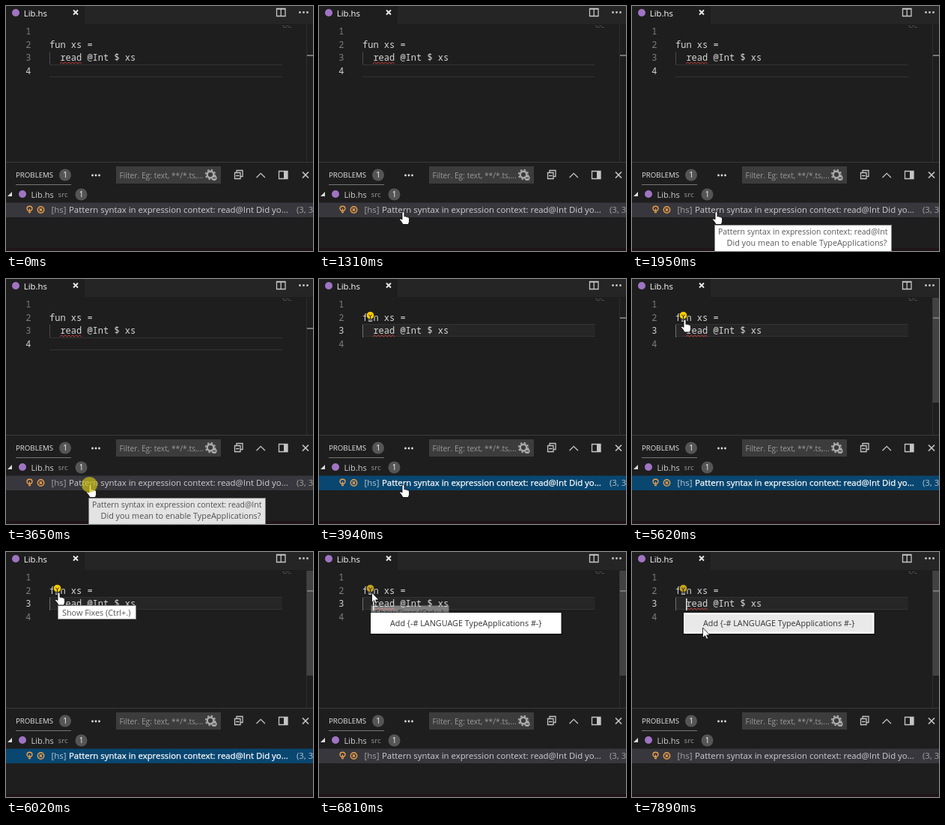
Write an HTML page that moves like this. It is 410x327 px and loops after 8 s.

```html
<!DOCTYPE html>
<html lang="en">
<head>
<meta charset="utf-8">
<title>Quick fix in the editor</title>
<style>
html, body { margin: 0; height: 100%; overflow: hidden; background: #1e1e1e; }
svg { display: block; width: 410px; height: 327px; font: 11.4px "Open Sans", "Noto Sans", sans-serif; }
text { white-space: pre; fill: #d0d0d0; }
.code text { font: 12px "Noto Sans Mono", "DejaVu Sans Mono", monospace; fill: #d8d8d8; }
.code .num { fill: #7c7c7c; text-anchor: end; }
.code .num.on { fill: #d0d0d0; }
.line { fill: none; stroke: #c5c5c5; stroke-width: 1.3; }
.badge { fill: #555; }
.count { font-size: 10px; text-anchor: middle; fill: #fff; }
.dim { fill: #a4a4a4; }
.focus .dim { fill: #b9c6d0; }
.focus #message { fill: #fff; stroke: #fff; stroke-width: .25; }
.tip rect { fill: #fff; stroke: #888; }
.tip text { fill: #575757; font-size: 10.85px; }
.mouse { fill: #fff; stroke: #000; stroke-width: .8; stroke-linejoin: round; }
</style>
</head>
<body>
<svg viewBox="0 0 410 327">
  <!-- tab bar -->
  <rect x="105" width="305" height="24" fill="#252526"/>
  <circle cx="13" cy="9" r="5" fill="#a074c4"/>
  <text x="23.800" y="13.500" font-size="11.300" style="fill:#fff">Lib.hs</text>
  <path class="line" d="M90 5.500l6 6m0-6l-6 6" style="stroke:#eee;stroke-width:1.800"/>
  <path class="line" d="M361.500 3.500h11.500v10h-11.500zM367.200 3.500v10M361.500 4h11.500"/>
  <g fill="#c5c5c5"><circle cx="392.500" cy="8.500" r="1.400"/><circle cx="397.500" cy="8.500" r="1.400"/><circle cx="402.500" cy="8.500" r="1.400"/></g>

  <!-- editor -->
  <path d="M369 26.500h3m2 0h4M370 28.500h5m2 0h4" stroke="#555" stroke-width=".8"/>
  <path d="M401.500 25V208" stroke="#2f2f2f"/>
  <rect id="slider" x="401.500" y="25" width="8.500" height="140" fill="#424242"/>
  <rect id="mark" x="402" width="8" height="2" fill="#777"/>
  <g id="current">
    <rect id="shade" x="58" width="310.500" height="17" fill="#262626"/>
    <path d="M58 .500h310.500M58 16.500h310.500" stroke="#333"/>
  </g>
  <path id="guide" d="M58.500 61v17"/>
  <g class="code">
    <text class="num" x="33.500" y="38">1</text>
    <text class="num" x="33.500" y="55.500">2</text>
    <text class="num" id="n3" x="33.500" y="73">3</text>
    <text class="num" id="n4" x="33.500" y="91">4</text>
    <text x="58" y="55.500">fun xs =</text>
    <text x="72.400" y="73">read @Int $ xs</text>
  </g>
  <path id="squiggle" fill="none" stroke="#c9403a"/>
  <path id="caret" d="M72.800 62v16" stroke="#ddd" stroke-width="1.600"/>
  <g id="bulb" stroke="#1e1e1e">
    <rect x="65.700" y="51" width="5.600" height="6.500" fill="#bbb"/>
    <circle cx="68.500" cy="48.500" r="5.300"/>
    <path d="M66.300 47.500l2.200 2.500 2.200-2.500M68.500 50v3M66.500 55h4" fill="none"/>
  </g>

  <!-- panel -->
  <path d="M0 208.500H410" stroke="#3a3a3a"/>
  <text x="13" y="229" font-size="9.700" style="fill:#e7e7e7">PROBLEMS</text>
  <path d="M13 238.500H87" stroke="#777"/>
  <circle class="badge" cx="79" cy="225.500" r="8"/>
  <text class="count" x="79" y="229">1</text>
  <g fill="#ddd"><circle cx="115.500" cy="226" r="1.400"/><circle cx="120" cy="226" r="1.400"/><circle cx="124.500" cy="226" r="1.400"/></g>
  <rect x="147" y="214" width="140" height="23" fill="#3c3c3c"/>
  <text x="151.500" y="229.500" font-size="10.250" style="fill:#999">Filter. Eg: text, **/*.ts,...</text>
  <circle cx="273" cy="225" r="4.300" fill="none" stroke="#aaa" stroke-width="2.400"/>
  <circle cx="273" cy="225" r="6.300" fill="none" stroke="#aaa" stroke-width="1.800" stroke-dasharray="2.470"/>
  <circle cx="278" cy="229.500" r="3.600" fill="#aaa"/>
  <path d="M276 229.500h4" stroke="#3c3c3c" stroke-width="1.300"/>
  <path class="line" d="M308 222v-2.500h8v8h-2.500M305.500 222.500h7.500v8h-7.500zM307 226.500h4.500"/>
  <path class="line" d="M334.500 229l5.700-5.700 5.700 5.700" stroke-width="1.800"/>
  <path class="line" d="M364.500 220.500h11.500v10h-11.500z"/>
  <rect x="371" y="220.500" width="5" height="10" fill="#c5c5c5"/>
  <path class="line" d="M396 221.500l8 8m0-8l-8 8" style="stroke-width:1.700"/>

  <rect id="hover" y="242" width="410" height="20" fill="#2a2d2e"/>
  <path d="M8 248v6H2z" fill="#ddd"/>
  <circle cx="22" cy="251" r="5" fill="#a074c4"/>
  <text x="33.500" y="255.500" font-size="11">Lib.hs</text>
  <text x="69.500" y="255" font-size="9.800" style="fill:#999">src</text>
  <circle class="badge" cx="100.500" cy="251.500" r="8"/>
  <text class="count" x="100.500" y="255">1</text>
  <g id="row">
    <rect id="back" y="262.500" width="410" height="19.500"/>
    <g fill="none" stroke="#f0a04a" stroke-width="1.400">
      <path d="M30 273.500q-2-1.500-2-3a3.500 3.200 0 0 1 7 0q0 1.500-2 3zM30 275.500h3M31.500 273v-2.500"/>
      <circle cx="46.500" cy="272" r="4.200"/>
      <path d="M44.800 270.300l3.400 3.400m0-3.400l-3.400 3.400"/>
    </g>
    <text class="dim" x="60.500" y="276" font-size="11.400">[hs]</text>
    <text id="message" x="84" y="276">Pattern syntax in expression context: read@Int Did yo...</text>
    <text class="dim" x="388" y="276">(3, 3</text>
  </g>
  <rect y="323" width="410" height="4" fill="#1f1519"/>

  <!-- overlays -->
  <g id="errorTip" class="tip">
    <rect x="110.500" y="292.500" width="236" height="36"/>
    <text x="115" y="305" style="font-size:10.450px">Pattern syntax in expression context: read@Int</text>
    <text x="126.500" y="320">Did you mean to enable TypeApplications?</text>
  </g>
  <g id="fixTip" class="tip">
    <rect x="69.500" y="71.500" width="104" height="18"/>
    <text x="75" y="84.500">Show Fixes (Ctrl+.)</text>
  </g>
  <g id="menu">
    <rect x="68" y="80" width="257" height="31" fill="#000" opacity=".45"/>
    <rect x="69" y="81" width="254.500" height="28" fill="#fff"/>
    <rect id="item" x="71" y="83.500" width="250.500" height="23" fill="#e9e9e9"/>
    <text x="95" y="99" font-size="10.800" style="fill:#333">Add {-# LANGUAGE TypeApplications #-}</text>
  </g>
  <g id="mouse" class="mouse">
    <path id="arrow" d="M0 0V13.500L3.100 10.700 5.100 15.200 7.200 14.300 5.200 9.900H9.500Z"/>
    <path id="hand" d="M-1.500 1Q0-1 1.500 1V6.500Q3 5.500 4 7Q5.500 6.200 6.300 7.600Q7.700 7 8 9V13Q7.700 15 6.700 17H-.5Q-2 13.500-5 10.500Q-4.500 8.300-1.500 10.500Z"/>
    <path id="beam" d="M-2.500-7H2.500M0-7V7M-2.500 7H2.500" style="stroke:#ddd;stroke-width:1.200"/>
  </g>
  <circle id="click" r="10.500" fill="#cdc118"/>
</svg>
<script>
const LOOP = 8000;
const el = {};
document.querySelectorAll('[id]').forEach(e => el[e.id] = e);
const set = (id, name, value) => el[id].setAttribute(name, value);
const fade = (id, value) => set(id, 'opacity', +value);
const place = (id, x, y) => set(id, 'transform', `translate(${x} ${y})`);
const within = (t, a, b) => t >= a && t < b;

// Progress 0..1 in n jumps, the first at a and the last at b.
const steps = (t, a, b, n) =>
  t < a ? 0 : Math.min(1, (Math.floor((t - a) / (b - a) * (n - 1) + 1e-6) + 1) / n);
const ease = p => p * p * (3 - 2 * p);

const moves = [
  { a: 610, b: 1310, n: 10, from: [258, 321], to: [112.5, 274.5] },
  { a: 4680, b: 5390, n: 10, from: [112.5, 274.5], to: [70.5, 54] },
  { a: 7500, b: 7890, n: 6, from: [70.5, 54], to: [94.5, 101] }
];

function mouseAt(t) {
  const m = moves.filter(m => t >= m.a).pop() || moves[0];
  const p = ease(steps(t, m.a, m.b, m.n));
  return m.from.map((v, i) => v + (m.to[i] - v) * p);
}

let wave = 'M72 77';
for (let i = 1; i <= 12; i++) wave += `L${72 + i * 2.4} ${i % 2 ? 75 : 77}`;
set('squiggle', 'd', wave);

function draw(t) {
  const [x, y] = mouseAt(t);
  const jumped = t >= 3795, menu = t >= 6710;
  const focus = within(t, 3720, 6710);

  place('current', 0, jumped ? 60 : 78);
  fade('shade', jumped);
  set('guide', 'stroke', jumped ? '#707070' : '#484848');
  set('mark', 'y', jumped ? 51 : 65);
  el.n3.classList.toggle('on', jumped);
  el.n4.classList.toggle('on', !jumped);
  el.row.classList.toggle('focus', focus);
  set('back', 'fill', focus ? '#094771' : '#37373d');
  fade('bulb', t >= 3860);
  set('bulb', 'fill', menu ? '#c4a01c' : '#fc0');
  fade('caret', within(t, 6770, 7270) || t >= 7770);
  fade('slider', t > 4680 && y < 208);
  fade('hover', t > 4680 && within(y, 242, 262));

  fade('errorTip', steps(t, 1710, 1950, 4) * (1 - steps(t, 3650, 3940, 5) ** 1.3));
  fade('fixTip', steps(t, 5790, 6020, 4) * (1 - steps(t, 6640, 6950, 5)));
  fade('menu', menu);
  fade('item', menu && y > 83);

  fade('click', within(t, 3650, 3795) || within(t, 6640, 6790) ? .7 : 0);
  place('click', x - 1, y);

  const hand = within(y, 262, 282) || within(t, 5550, 6710);
  const beam = !hand && within(t, 4680, 5390) && within(y, 60, 208);
  fade('mouse', t >= 610);
  place('mouse', x, y);
  fade('hand', hand);
  fade('beam', beam);
  fade('arrow', !hand && !beam);
}

function frame() {
  draw(performance.now() % LOOP);
  requestAnimationFrame(frame);
}
frame();
</script>
</body>
</html>
```
